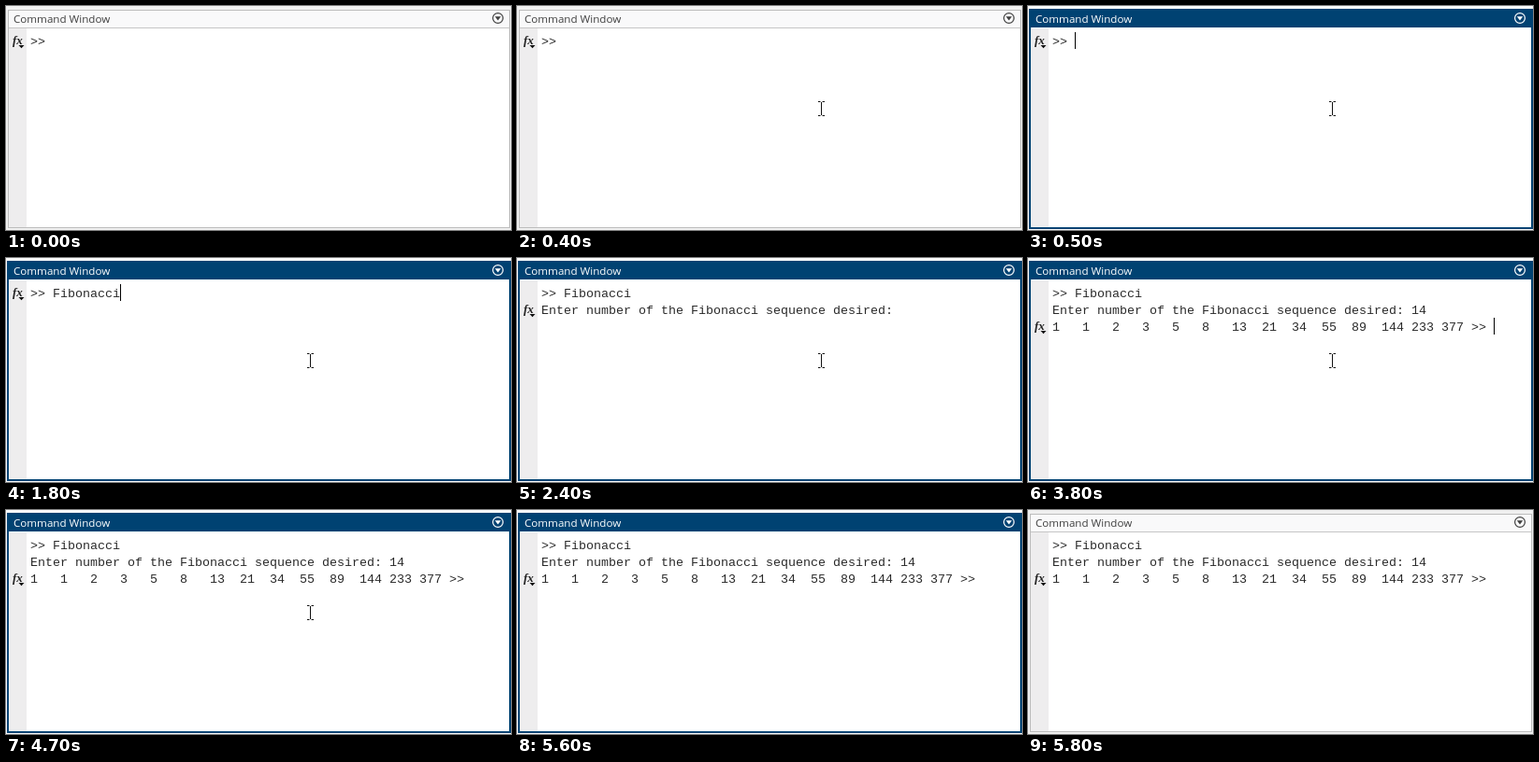
Write an HTML page that moves like this. It is 540 px wide and 240 px high and loops after 5.9 s.

```html
<!DOCTYPE html>
<html lang="en">
<head>
<meta charset="utf-8">
<title>Command Window</title>
<style>
  html, body { margin: 0; width: 100%; height: 100%; overflow: hidden; background: #f0f0f0; }
  svg { display: block; width: 540px; height: 240px; }
  text { white-space: pre; }
  .title { font: 11.6px "Open Sans", "Noto Sans", sans-serif; }
  .code { font: 13.333px "Liberation Mono", monospace; fill: #2a2a2a; }
  .fx { font: italic bold 13px "Liberation Serif", serif; fill: #222; }
</style>
</head>
<body>
<svg viewBox="0 0 540 240">
  <g id="idle">
    <rect width="540" height="240" fill="#f0f0f0"/>
    <rect x="2.5" y="4.5" width="536" height="233" fill="#fff" stroke="#bcbcbc"/>
    <rect x="3" y="5" width="535" height="18" fill="#f9f9fa"/>
    <rect x="3" y="23" width="535" height="1" fill="#c6c6c6"/>
  </g>
  <g id="active">
    <rect width="540" height="240" fill="#fafafa"/>
    <rect x="1" y="3" width="539" height="236" fill="#004272"/>
    <rect x="3" y="23" width="535" height="214" fill="#fff"/>
  </g>
  <rect x="3" y="24" width="19" height="213" fill="#eeedee"/>
  <g id="bar">
    <text class="title" x="8" y="18" fill="currentColor">Command Window</text>
    <circle cx="526" cy="13" r="5.4" fill="none" stroke="currentColor" stroke-width="1.2"/>
    <path d="M522.8 11.2h6.4l-3.2 4.2z" fill="currentColor"/>
  </g>
  <g id="fx">
    <text class="fx" x="7" y="41">fx</text>
    <path d="M13.5 42h6l-3 3.2z" fill="#111"/>
  </g>
  <g id="lines"></g>
  <rect id="caret" width="1" height="18" fill="#000"/>
  <path id="beam" d="M-3 -7.5H-.5M1.5 -7.5H4M.5 -7V7M-3 7.5H-.5M1.5 7.5H4" fill="none" stroke="#111"/>
</svg>
<script>
const LOOP = 5900, STEP = 100, LEFT = 26, CHAR = 8, ROW = 18;
const $ = id => document.getElementById(id);
const show = (el, on) => el.setAttribute("visibility", on ? "visible" : "hidden");
const move = (el, x, y) => el.setAttribute("transform", `translate(${x} ${y})`);

function fibonacci(n) {
  const list = [1, 1];
  while (list.length < n) list.push(list.at(-1) + list.at(-2));
  return list;
}

const command = ">> Fibonacci";
const question = "Enter number of the Fibonacci sequence desired: ";
const output = fibonacci(14).map(n => String(n).padEnd(4)).join("") + ">> ";

// Console contents from each moment on
const states = [
  [0, [">> "]],
  [1500, [command]],
  [1900, [command, question]],
  [2500, [command, question + "1"]],
  [3000, [command, question + "14"]],
  [3800, [command, question + "14", output]]
];
// Spans in which the text caret is lit
const lit = [[500, 1100], [1500, 2400], [2500, 3500], [3800, 4300], [4900, 5400]];
// Pointer way points: time, x, y
const enter = [[100, 495, 210], [300, 370, 140], [400, 325, 110]];
const leave = [[5200, 325, 110], [5300, 330, 84], [5500, 346, 8]];

const rows = [0, 1, 2].map(i => {
  const row = document.createElementNS("http://www.w3.org/2000/svg", "text");
  row.setAttribute("class", "code");
  row.setAttribute("x", LEFT);
  row.setAttribute("y", 42 + i * ROW);
  return $("lines").appendChild(row);
});

function along(path, t) {
  const i = path.findIndex(p => p[0] >= t);
  if (i < 0) return path.at(-1).slice(1);
  if (i === 0) return path[0].slice(1);
  const [a, b] = [path[i - 1], path[i]];
  const k = (t - a[0]) / (b[0] - a[0]);
  return [a[1] + (b[1] - a[1]) * k, a[2] + (b[2] - a[2]) * k];
}

function render(time) {
  const t = Math.floor((time % LOOP) / STEP) * STEP;
  const active = t >= 500 && t < 5800;
  const text = states.findLast(s => t >= s[0])[1];
  const last = text.length - 1;

  show($("idle"), !active);
  show($("active"), active);
  $("bar").style.color = active ? "#fff" : "#3f3f3f";
  rows.forEach((row, i) => row.textContent = text[i] || "");
  move($("fx"), 0, last * ROW);

  move($("caret"), LEFT + text[last].length * CHAR, 28 + last * ROW);
  show($("caret"), lit.some(([a, b]) => t >= a && t < b));

  const [x, y] = along(t < 3000 ? enter : leave, t);
  move($("beam"), Math.round(x), Math.round(y));
  show($("beam"), t >= 100 && t < 5600);
}

const start = performance.now();
function tick() {
  render(performance.now() - start);
  requestAnimationFrame(tick);
}
tick();
</script>
</body>
</html>
```
